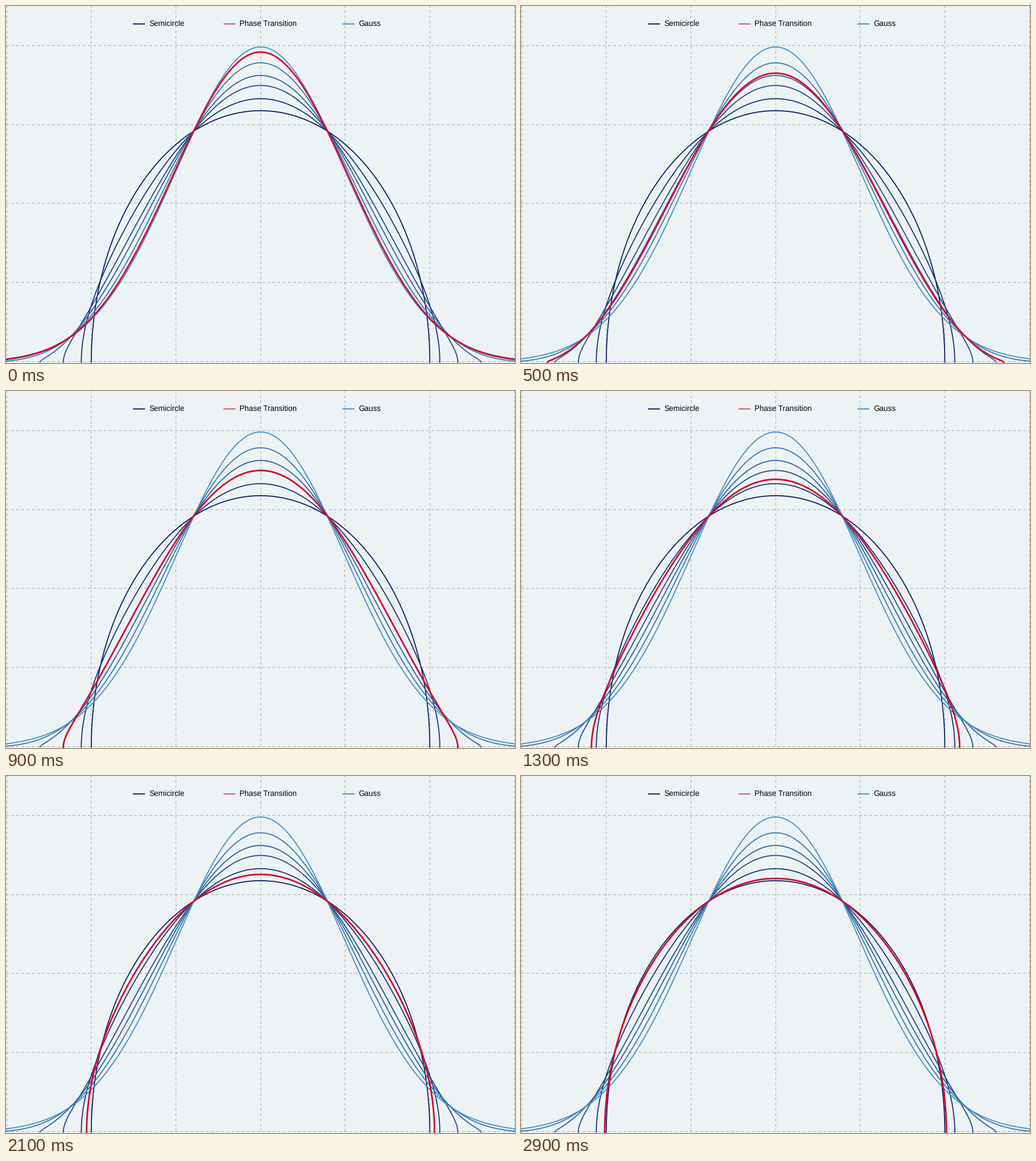
Recreate the animation shown at these times as a matplotlib script. Size 894 by 627 pixels, loop 3000 ms.

```python
import numpy as np
import matplotlib
import matplotlib.pyplot as plt
from matplotlib.animation import FuncAnimation

W, H, DPI = 894, 627, 64
PT = 72 / DPI                      # points per pixel
X0, Y0 = 447.1, 625.7              # pixel position of the curves' zero
UX, UY = 148.65, 1388.0            # pixels per unit
GRID_Y0 = 624.4
BG, GRID, RED = "#edf2f4", "#a3a8ab", "#d9042b"
NAVY = np.array([8, 30, 98]) / 255
SKY = np.array([62, 143, 203]) / 255

matplotlib.rcParams["text.hinting"] = "none"
matplotlib.rcParams["lines.scale_dashes"] = False


def density(lam):
    """q-Gaussian density with q = exp(-4 lam / 3): Gauss at 0, semicircle at inf."""
    if lam == 0:
        x = np.linspace(-3.2, 3.2, 801)
        return x, np.exp(-x * x / 2) / np.sqrt(2 * np.pi)
    q = np.exp(-4 * lam / 3)
    theta = np.linspace(0, np.pi, 1001)
    qn = q ** np.arange(1, 201)[:, None]
    factors = (1 - qn) * (1 - 2 * qn * np.cos(2 * theta) + qn ** 2)
    y = np.sqrt(1 - q) / np.pi * np.sin(theta) * factors.prod(axis=0)
    return 2 * np.cos(theta) / np.sqrt(1 - q), y


def to_pixels(lam):
    x, y = density(lam)
    return X0 + UX * x, Y0 - UY * y


def stroke(xs, ys, color, width, **kw):
    return ax.plot(xs, ys, color=color, lw=width * PT, snap=False, **kw)[0]


def crisp(v):
    return np.floor(v) + 0.5


fig = plt.figure(figsize=(W / DPI, H / DPI), dpi=DPI, facecolor=BG)
ax = fig.add_axes([0, 0, 1, 1])
ax.set_xlim(0, W)
ax.set_ylim(H, 0)
ax.axis("off")

dash = (0, (5 * PT, 4 * PT))
for k in range(-3, 4):
    x = crisp(X0 + k * UX)
    stroke([x, x], [GRID_Y0, 0], GRID, 1, ls=dash)
for k in range(5):
    y = crisp(GRID_Y0 - k * UY / 10)
    stroke([0, W], [y, y], GRID, 1, ls=dash)

for i, lam in enumerate([np.inf, 5 / 3, 1, 2 / 3, 1 / 3, 0]):
    stroke(*to_pixels(lam), NAVY + (SKY - NAVY) * i / 5, 1.8)
moving = stroke([], [], RED, 2.8)

legend = [(223, 251.4, "Semicircle", NAVY, 2),
          (382, 410, "Phase Transition", RED, 1.3),
          (591, 619.4, "Gauss", SKY, 2)]
for x, tx, label, color, width in legend:
    stroke([x, x + 21], [31.5, 31.5], color, width, solid_capstyle="butt")
    ax.text(tx, 35, label, family="Liberation Sans", size=13.5 * PT,
            color="black", va="baseline")


def draw(frame):
    moving.set_data(*to_pixels(0.1 * (frame + 1)))
    return (moving,)


anim = FuncAnimation(fig, draw, frames=30, interval=100, repeat=True,
                     repeat_delay=0)
plt.show()
```
